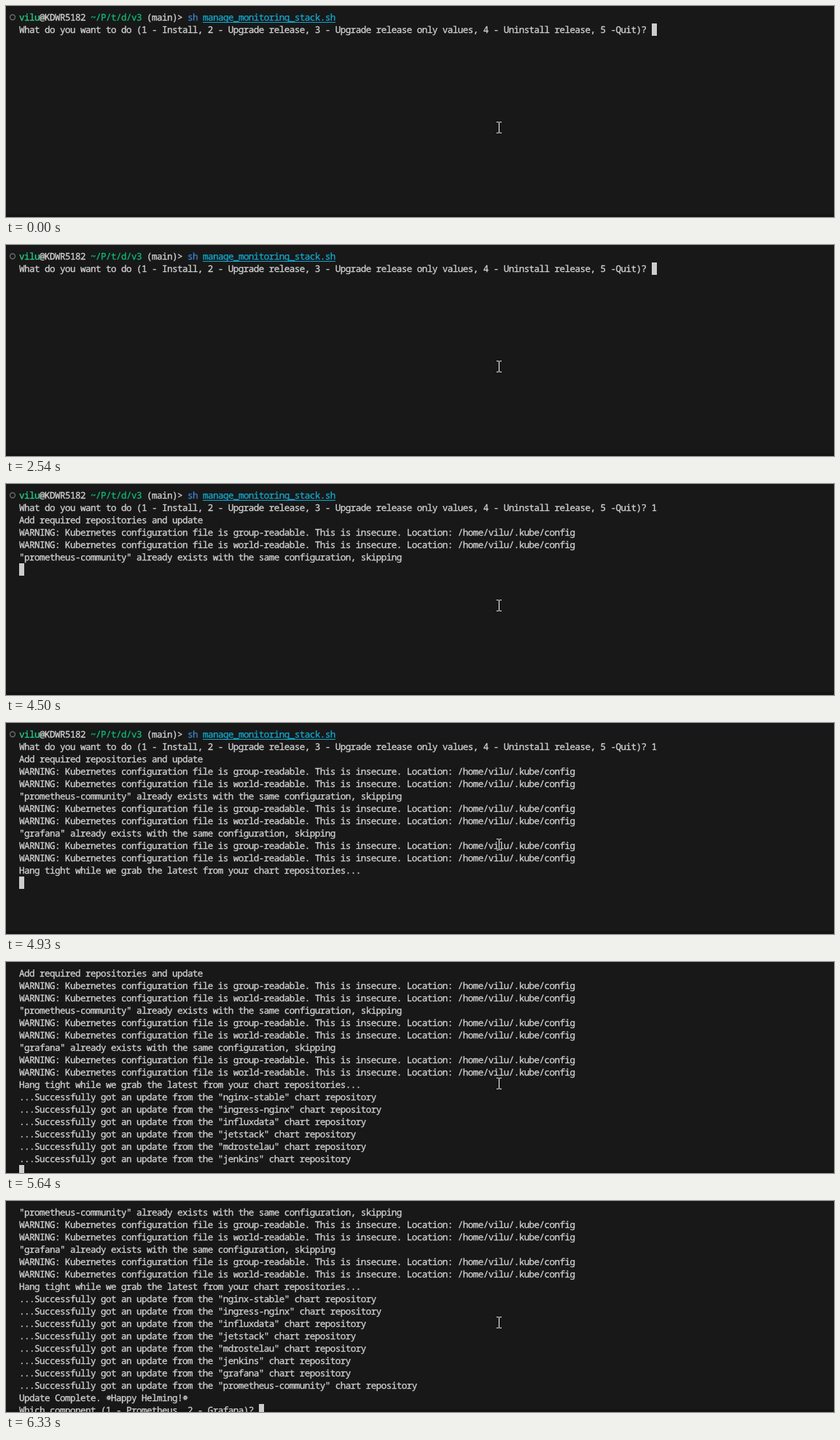
Recreate the animation shown at these times as an HTML page. Size 1136 by 290 pixels, loop 8000 ms.

```html
<!DOCTYPE html>
<html lang="en">
<head>
<meta charset="utf-8">
<title>Terminal session</title>
<style>
  html, body { margin: 0; width: 100%; height: 100%; overflow: hidden; background: #181818; }
  svg { display: block; width: 100%; height: 100%; }
  text {
    font: 12.6px "Noto Sans Mono", "DejaVu Sans Mono", monospace;
    letter-spacing: -0.56px;
    font-variant-ligatures: none;
    text-rendering: geometricPrecision;
    white-space: pre;
    stroke-width: 0.3px;
  }
  text, tspan { fill: var(--ink, #d2d2d2); stroke: var(--ink, #d2d2d2); }
  .user { --ink: #23d18b; }
  .path { --ink: #0dbc79; }
  .cmd { --ink: #3a80cd; }
  .arg { --ink: #11a8cd; }
</style>
</head>
<body>
<svg viewBox="0 0 1136 290">
  <rect width="1136" height="290" fill="#181818"/>
  <rect y="286" width="1136" height="4" fill="#141414"/>
  <g id="screen">
    <rect id="cursor" width="7" height="17" fill="#ccc"/>
  </g>
  <g id="pointer" fill="none">
    <path d="M673 159.5h3m1 0h3M676.5 160v14M673 174.5h3m1 0h3" stroke="#181818" stroke-width="3"/>
    <path d="M673 159.5h3m1 0h3M676.5 160v14M673 174.5h3m1 0h3" stroke="#fff"/>
  </g>
</svg>
<script>
const LOOP = 8000, CELL = 7, ROW = 17, LEFT = 18, TOP = 7, LAST_ROW = 16;
const NS = "http://www.w3.org/2000/svg";
const screen = document.getElementById("screen");
const cursor = document.getElementById("cursor");

const question = "What do you want to do (1 - Install, 2 - Upgrade release, " +
  "3 - Upgrade release only values, 4 - Uninstall release, 5 -Quit)? ";
const component = "Which component (1 - Prometheus, 2 - Grafana)? ";
const warnings = ["group", "world"].map(who =>
  `WARNING: Kubernetes configuration file is ${who}-readable. This is insecure. Location: /home/vilu/.kube/config`);
const exists = repo => `"${repo}" already exists with the same configuration, skipping`;
const updated = repo => `...Successfully got an update from the "${repo}" chart repository`;
const repos = ["nginx-stable", "ingress-nginx", "influxdata", "jetstack",
  "mdrostelau", "jenkins", "grafana", "prometheus-community"];

const prompt = [["vilu", "user"], ["@KDWR5182 "], ["~/P/t/d/v3", "path"],
  [" (main)> "], ["sh", "cmd"], [" "], ["manage_monitoring_stack.sh", "arg"]];
const lines = [
  "", question, "Add required repositories and update",
  ...warnings, exists("prometheus-community"),
  ...warnings, exists("grafana"),
  ...warnings, "Hang tight while we grab the latest from your chart repositories...",
  ...repos.map(updated),
  "Update Complete.  Happy Helming! ", component
];

// [time, lines printed, answer being typed (null when no input is awaited)]
const steps = [
  [0, 2, ""], [1410, 2, "1"], [2540, 2, ""], [2700, 2, "2"], [3420, 2, ""], [3570, 2, "1"],
  [4230, 3, null], [4500, 6, null], [4650, 9, null], [4930, 12, null],
  [5080, 14, null], [5210, 16, null], [5360, 17, null], [5640, 18, null],
  [6180, 19, null], [6330, 22, ""]
];

function add(parent, tag, attrs, text) {
  const el = document.createElementNS(NS, tag);
  for (const key in attrs) el.setAttribute(key, attrs[key]);
  if (text) el.textContent = text;
  return parent.appendChild(el);
}

function addWheel(parent, col, y) {
  const at = { cx: LEFT + (col + 0.5) * CELL + 0.5, cy: y + 8.5, fill: "none", stroke: "#ccc" };
  add(parent, "circle", { ...at, r: 1.6, "stroke-width": 1.6 });
  add(parent, "circle", { ...at, r: 3, "stroke-width": 1, "stroke-dasharray": "1.2 1.156" });
}

const rows = lines.map((line, i) => {
  const y = TOP + i * ROW;
  const row = add(screen, "g", {});
  const text = add(row, "text", { x: LEFT, y: y + 13 }, line);
  if (i === 0) {
    prompt.forEach(([part, kind]) => add(text, "tspan", kind ? { class: kind } : {}, part));
    add(row, "circle", { cx: 9, cy: 15.5, r: 3.5, fill: "none", stroke: "#6a6a6a", "stroke-width": 1.4 });
    add(row, "rect", { x: 270, y: 22, width: 182, height: 1, fill: "#11a8cd" });
  }
  if (line.startsWith("Update")) [17, 32].forEach(col => addWheel(row, col, y));
  return row;
});
const questionText = rows[1].firstChild;

function render(t) {
  const [, count, typed] = steps.findLast(step => step[0] <= t);
  const waiting = typed !== null;
  const line = waiting ? count - 1 : count;
  const col = waiting ? lines[line].length + typed.length : 0;
  const scroll = Math.max(0, line - LAST_ROW);

  rows.forEach((row, i) => row.setAttribute("visibility", i >= scroll && i < count ? "visible" : "hidden"));
  questionText.textContent = question + (count === 2 ? typed : "1");
  cursor.setAttribute("x", LEFT + col * CELL);
  cursor.setAttribute("y", TOP + line * ROW);
  screen.setAttribute("transform", `translate(0 ${-scroll * ROW})`);
}

const start = performance.now();
function tick() {
  render((performance.now() - start) % LOOP);
  requestAnimationFrame(tick);
}
tick();
</script>
</body>
</html>
```
